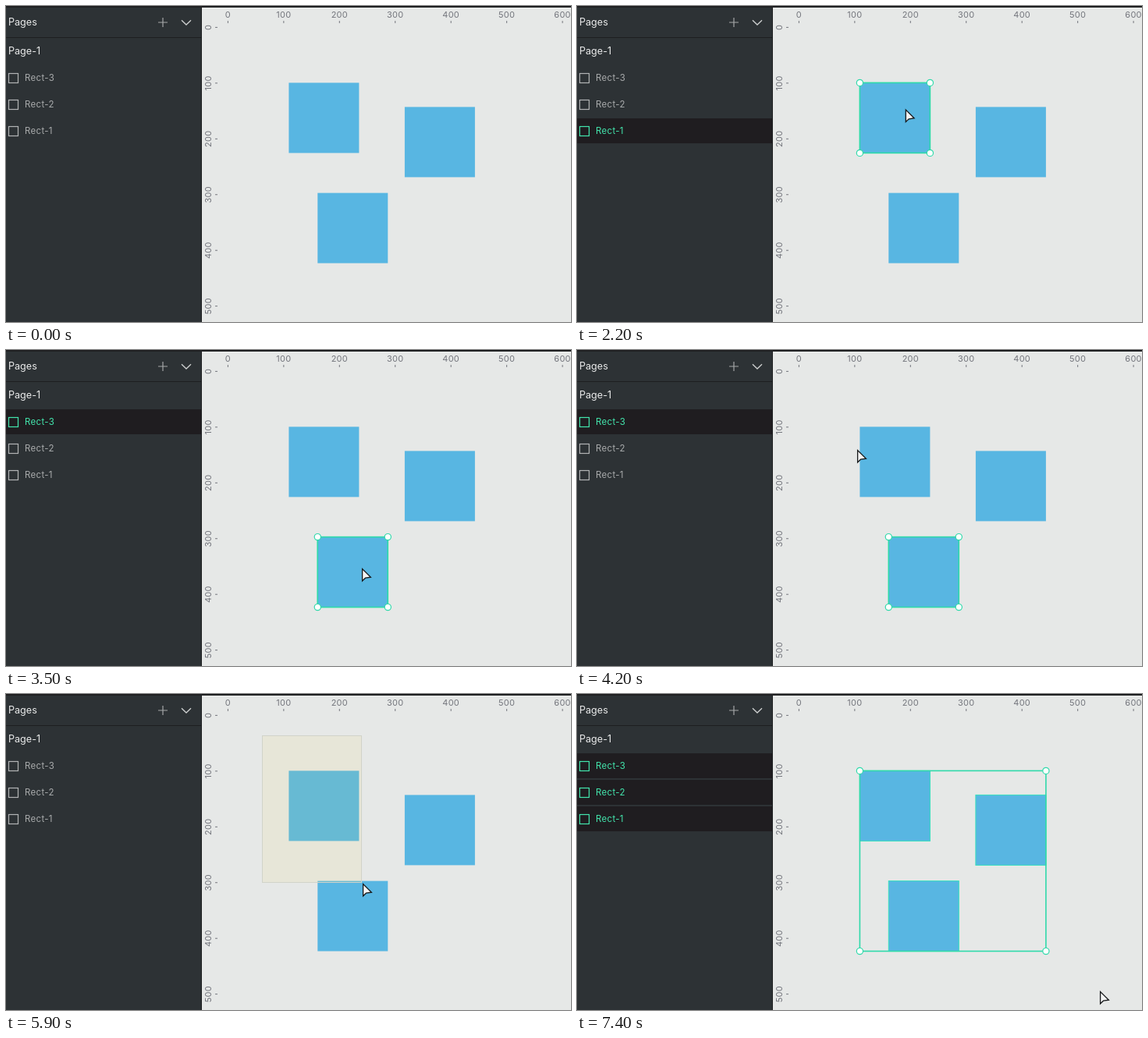
An HTML page that plays this animation: 724 px wide and 405 px high, repeating every 8 s.

```html
<!DOCTYPE html>
<html lang="en">
<head>
<meta charset="utf-8">
<title>Selecting shapes</title>
<style>
  html, body { margin: 0; width: 100%; height: 100%; overflow: hidden; background: #e6e8e7; }
  svg { display: block; font-family: Inter, "Open Sans", sans-serif; }
  .title { font-size: 12.6px; fill: #eaebeb; }
  .ruler { font-size: 11px; letter-spacing: .25px; fill: #74767d; text-anchor: middle; }
  .tick { stroke: #74767d; }
  .row text { font-size: 11.5px; letter-spacing: .3px; fill: #a9abac; }
  .row .icon { fill: none; stroke: #b2b4b5; stroke-width: 1.2; }
  .row .back { fill: none; }
  .row.on text { fill: #43e6ad; }
  .row.on .icon { stroke: #43e6ad; }
  .row.on .back { fill: #1f1d20; }
  .shape { fill: #58b6e2; }
  .hover { fill: none; stroke: #35e0bd; }
  .frame { fill: none; stroke: #2fd9aa; stroke-width: 1.6; }
  .handle { fill: #fff; stroke: #2fd9aa; stroke-width: 1.2; }
</style>
</head>
<body>
<svg width="724" height="405" viewBox="0 0 724 405">
  <g id="rulers"></g>
  <rect width="250" height="405" fill="#2d3235"/>
  <path d="M250.5 0V405M0 40.5H250" stroke="#1d1f20"/>
  <rect width="724" height="2" fill="#1f2022"/>
  <text class="title" x="3" y="25">Pages</text>
  <text class="title" x="3" y="62">Page-1</text>
  <path d="M195 21H207M201 15V27" stroke="#a5a7a8" stroke-width="1.2"/>
  <path d="M225 18.3L231 24L237 18.3" fill="none" stroke="#cfd1d1" stroke-width="1.3"/>
  <g id="rows"></g>
  <g id="shapes"></g>
  <rect id="marquee" fill="#e6d94e" fill-opacity=".1" stroke="#d1d3c9"/>
  <g id="frame"></g>
  <path id="cursor" d="M.6 .5V15.9L4.5 12.2L11.4 11.2Z" fill="#f4f5f5" stroke="#17191b" stroke-width="1.3"/>
</svg>
<script>
const $ = id => document.getElementById(id);
const LOOP = 8000, STEP = 100, SIZE = 90, UNIT = 71.45;
const APPEAR = 700, PRESS = 4800, RELEASE = 7400;

// Shapes in the order they were drawn
const shapes = [[362.4, 98.4], [510.9, 129.4], [399.3, 239.6]];

// Start time of each selection and the shapes in it
const selections = [
  [0, []], [1600, [0]], [2600, [1]], [3500, [2]], [PRESS, []], [RELEASE, [0, 1, 2]]
];

// Places the cursor rests at or passes: time, x, y
const stops = [
  [APPEAR, 357, 371], [1200, 380, 124], [2000, 380, 124],
  [2600, 537, 157], [2800, 537, 157], [3500, 456, 280], [3800, 456, 280],
  [4200, 359, 128], [4600, 330, 55], [PRESS, 330, 55],
  [5900, 457, 243], [6500, 583, 359], [6900, 670, 381]
];

const slope = (i, axis) => {
  const a = stops[i], b = stops[i + 1];
  return a && b ? (b[axis] - a[axis]) / (b[0] - a[0]) : 0;
};

// Speed at a stop: zero at rest or a turn, else the mean of both sides
function speed(i, axis) {
  const a = slope(i - 1, axis), b = slope(i, axis);
  return a * b > 0 ? 2 * a * b / (a + b) : 0;
}

function cursorAt(t) {
  const next = stops.findIndex(s => s[0] > t);
  if (next < 0) return stops.at(-1).slice(1);
  if (next === 0) return stops[0].slice(1);
  const i = next - 1, span = stops[next][0] - stops[i][0];
  const k = (t - stops[i][0]) / span, ease = k * k * (3 - 2 * k);
  return [1, 2].map(axis => {
    const a = stops[i][axis], b = stops[next][axis];
    return a + (b - a) * ease + span * k * (1 - k) *
      ((1 - k) * speed(i, axis) - k * speed(next, axis));
  });
}

const box = (cls, x, y, w, h = w) =>
  `<rect class="${cls}" x="${x}" y="${y}" width="${w}" height="${h}"/>`;

let marks = "";
for (let i = 0; i < 7; i++) {
  const x = 284.4 + i * UNIT, y = 27.4 + i * UNIT;
  marks += `<text class="ruler" x="${x}" y="15">${i * 100}</text>
    <text class="ruler" transform="translate(263 ${y}) rotate(-90)">${i * 100}</text>
    <path class="tick" d="M${x} 19v3M268 ${y}h3"/>`;
}
$("rulers").innerHTML = marks;

$("rows").innerHTML = shapes.map((_, i) => {
  const y = 144 - i * 34;
  return `<g class="row">${box("back", 0, y, 250, 32)}${box("icon", 3.5, y + 10.5, 12)}
    <text x="24" y="${y + 20}">Rect-${i + 1}</text></g>`;
}).join("");
const rows = [...$("rows").children];

$("shapes").innerHTML = shapes.map(([x, y]) => box("shape", x, y, SIZE)).join("");

function selectionFrame(picked) {
  const xs = picked.map(i => shapes[i][0]), ys = picked.map(i => shapes[i][1]);
  const l = Math.min(...xs), r = Math.max(...xs) + SIZE;
  const t = Math.min(...ys), b = Math.max(...ys) + SIZE;
  const handles = [[l, t], [r, t], [r, b], [l, b]]
    .map(([x, y]) => `<circle class="handle" cx="${x}" cy="${y}" r="4.1"/>`);
  return box("frame", l, t, r - l, b - t) + handles.join("");
}

function setBox(el, [x0, y0], [x1, y1]) {
  const at = { x: x0 - 1.5, y: y0 - 1.5,
    width: Math.max(0, Math.round(x1 - x0)), height: Math.max(0, Math.round(y1 - y0)) };
  for (const name in at) el.setAttribute(name, at[name]);
}

function draw(t) {
  const cursor = cursorAt(t), visible = t >= APPEAR;
  const picked = selections.findLast(s => s[0] <= t)[1];
  rows.forEach((row, i) => row.classList.toggle("on", picked.includes(i)));

  const over = shape => shape.every((v, i) => cursor[i] >= v && cursor[i] <= v + SIZE);
  const outlined = shapes.filter((s, i) =>
    picked.length > 1 ? picked.includes(i) : visible && t < PRESS && over(s));
  $("frame").innerHTML = outlined.map(([x, y]) => box("hover", x, y, SIZE)).join("") +
    (picked.length ? selectionFrame(picked) : "");

  $("marquee").style.display = t >= PRESS && t < RELEASE ? "" : "none";
  setBox($("marquee"), cursorAt(PRESS), cursor);

  $("cursor").style.display = visible ? "" : "none";
  $("cursor").setAttribute("transform", `translate(${cursor})`);
}

const begin = performance.now();
function tick() {
  const t = (performance.now() - begin) % LOOP;
  draw(Math.floor(t / STEP) * STEP);
  requestAnimationFrame(tick);
}
tick();
</script>
</body>
</html>
```
